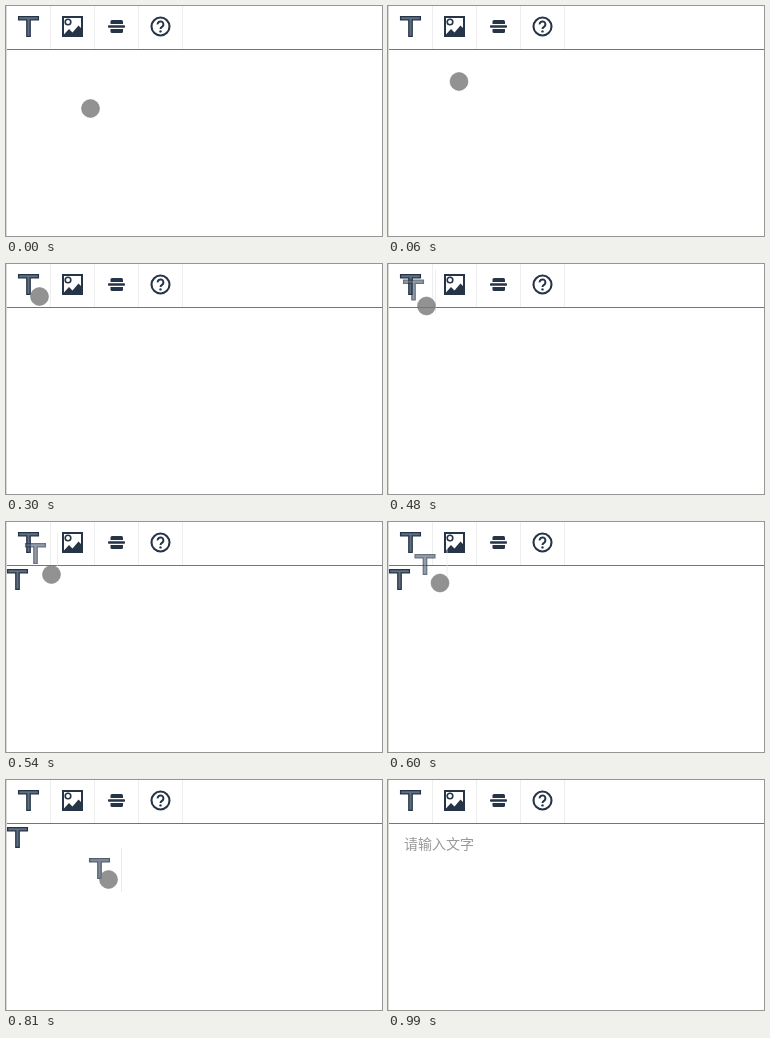
Recreate the animation shown at these times as an HTML page. Size 376x230 px, loop 1.47 s.

```html
<!DOCTYPE html>
<html lang="zh-CN">
<head>
<meta charset="utf-8">
<style>
html, body { margin: 0; width: 100%; height: 100%; overflow: hidden; background: #fff; }
svg { display: block; }
text { font: 14px "Noto Sans CJK SC", "Noto Sans CJK", sans-serif; fill: #999; }
</style>
</head>
<body>
<svg width="376" height="230" viewBox="0 0 376 230">
  <defs>
    <path id="tee" d="M.6 .6H20.4V3.9H12.2V20.4H8.8V3.9H.6Z" fill="#607080" stroke="#263447" stroke-width="1.3"/>
  </defs>
  <path d="M.5 0V230" stroke="#d8d8d8"/>
  <path d="M44.5 0V43M88.5 0V43M132.5 0V43M176.5 0V43" stroke="#eee"/>
  <path d="M1 43.5H376" stroke="#757575"/>

  <use href="#tee" x="12" y="10"/>
  <g fill="none" stroke="#263447" stroke-width="2">
    <rect x="57" y="11" width="19" height="19"/>
    <circle cx="62" cy="16" r="2.8" stroke-width="1.6"/>
    <circle cx="154.5" cy="20.5" r="9" stroke-width="2.1"/>
    <path d="M151.6 18.4a2.9 2.9 0 1 1 4.7 2.2q-1.8 1.2-1.8 2.5"/>
  </g>
  <g fill="#263447">
    <path d="M57 29.5L63 23L66.5 26.5L72.5 19.5L76 23V30H57Z"/>
    <path d="M106 14H115.5Q117 14 117 15.5V18H104.5V15.5Q104.5 14 106 14Z"/>
    <rect x="102" y="19.3" width="17" height="2.4" rx=".8"/>
    <path d="M104.5 23H117V25.5Q117 27 115.5 27H106Q104.5 27 104.5 25.5Z"/>
    <circle cx="154.5" cy="25.4" r="1.2"/>
  </g>

  <use id="slot" href="#tee" x="1" y="47"/>
  <text id="hint" x="16" y="69">请输入文字</text>
  <g id="ghost">
    <path d="M32.5 -10V34" stroke="#e6e6e6"/>
    <use href="#tee"/>
  </g>
  <circle id="touch" r="9" fill="#777" fill-opacity=".8" stroke="#777" stroke-opacity=".5"/>
</svg>
<script>
const LOOP = 1470, STEP = 30;
const DRAG = 420, ENTER = 510, RELEASE = 960, DROP = 990;

// Each key: time, x, y
const touchPath = [
  [0, 84.5, 102.5], [150, 52.5, 44.5], [300, 33.5, 32.5], [330, 31.5, 32],
  [390, 31.5, 32], [540, 45.5, 52.5], [690, 64.5, 75.5], [810, 102.5, 99.5]
];
const ghostPath = [
  [DRAG, 12, 11], [540, 19, 21], [690, 44, 53], [810, 83, 78]
];
const el = id => document.getElementById(id);

// Smooth curve through the keys, monotone between neighbours
function along(keys, t) {
  const last = keys.length - 1;
  if (t <= keys[0][0]) return keys[0].slice(1);
  if (t >= keys[last][0]) return keys[last].slice(1);
  const i = keys.findIndex(k => k[0] > t) - 1;
  const span = keys[i + 1][0] - keys[i][0], u = (t - keys[i][0]) / span;
  const slope = (j, c) => (keys[j + 1][c] - keys[j][c]) / (keys[j + 1][0] - keys[j][0]);
  const tangent = (j, c) => {
    if (j === 0) return slope(0, c);
    if (j === last) return slope(last - 1, c);
    const a = slope(j - 1, c), b = slope(j, c);
    return a * b > 0 ? 2 * a * b / (a + b) : 0;
  };
  return [1, 2].map(c => {
    const p = keys[i][c], q = keys[i + 1][c];
    const m = tangent(i, c) * span, n = tangent(i + 1, c) * span;
    return p + u * (m + u * (3 * (q - p) - 2 * m - n + u * (2 * (p - q) + m + n)));
  });
}

function show(id, on) {
  el(id).setAttribute("visibility", on ? "visible" : "hidden");
}

function place(id, keys, t) {
  const [x, y] = along(keys, t).map(v => Math.round(v * 2) / 2);
  el(id).setAttribute("transform", `translate(${x} ${y})`);
}

function draw(now) {
  const t = Math.floor(now % LOOP / STEP) * STEP;
  place("touch", touchPath, t);
  place("ghost", ghostPath, t);
  el("ghost").setAttribute("opacity", t < 750 ? .68 : .78);
  show("touch", t < RELEASE);
  show("ghost", t >= DRAG && t < RELEASE);
  show("slot", t >= ENTER && t < DROP);
  show("hint", t >= DROP);
}

const start = performance.now();
function tick() {
  draw(performance.now() - start);
  requestAnimationFrame(tick);
}
tick();
</script>
</body>
</html>
```
